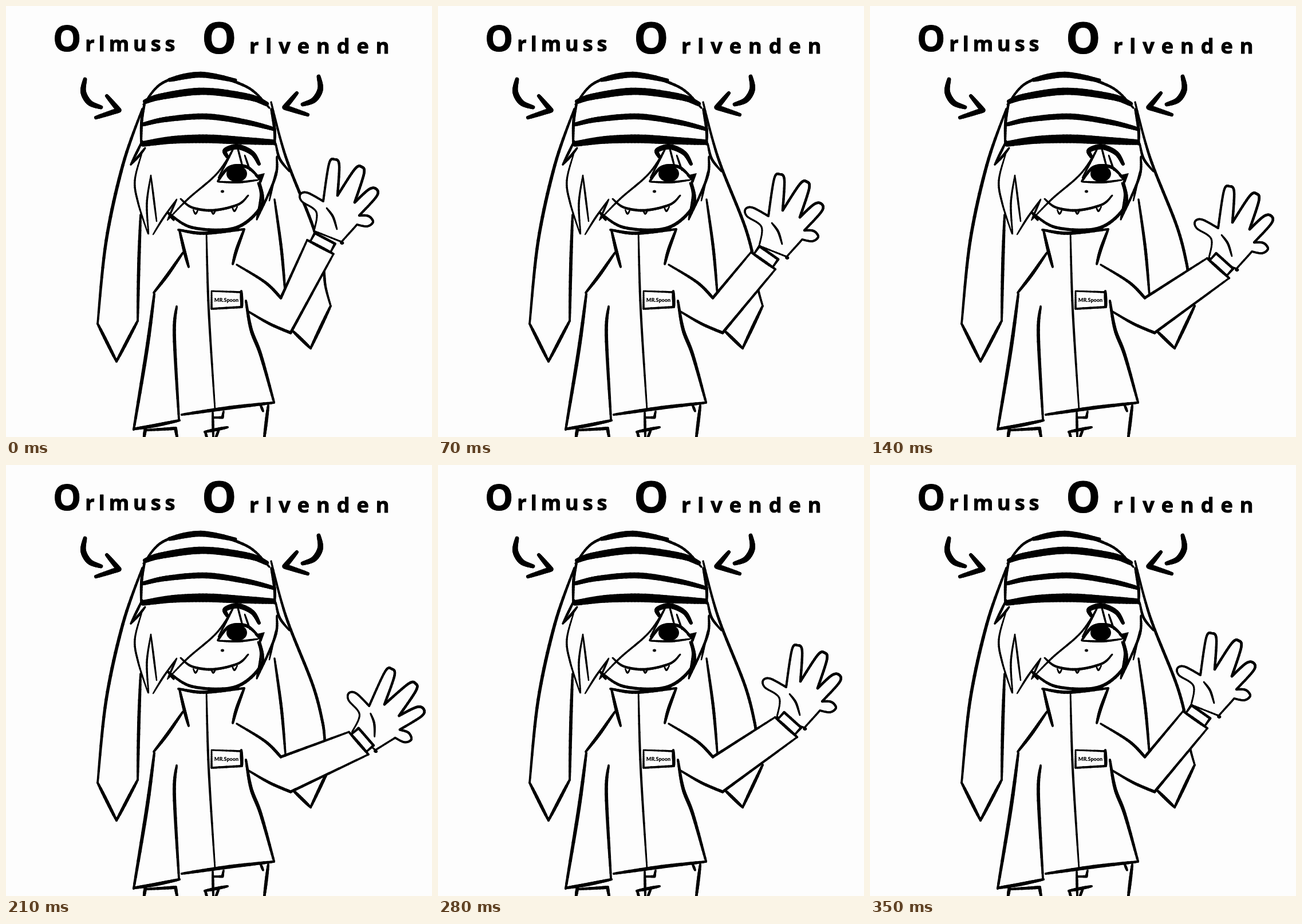
An HTML page with a canvas that plays this animation: 744 by 753 pixels, repeating every 0.42 s.

```html
<!DOCTYPE html>
<html lang="en">
<head>
<meta charset="utf-8">
<title>Waving character</title>
<style>
  html, body { margin: 0; width: 100%; height: 100%; overflow: hidden; background: #fdfdfd; }
  canvas, svg { position: absolute; left: 0; top: 0; }
  .name { font: 700 36px "Open Sans", "Noto Sans", sans-serif; stroke: #000; stroke-linejoin: round; }
  .tag { font: 900 9px Lato, "DejaVu Sans", sans-serif; text-anchor: middle; }
</style>
</head>
<body>
<canvas id="stage" width="744" height="753"></canvas>
<svg width="744" height="753">
  <text class="name" x="82" y="79" letter-spacing="7"><tspan font-size="62">O</tspan>rlmuss</text>
  <text class="name" x="342" y="83" letter-spacing="12"><tspan font-size="76">O</tspan><tspan x="425">rlvenden</tspan></text>
  <text class="tag" x="385" y="517">MR.Spoon</text>
</svg>
<script>
const PAPER = '#fdfdfd', INK = '#000';
const ctx = document.getElementById('stage').getContext('2d');
ctx.lineCap = ctx.lineJoin = 'round';

// "x,y x,y" to points; a trailing "!" doubles a point into a sharp corner.
const parse = text => text.split(' ').flatMap(part => {
  const p = part.replace('!', '').split(',').map(Number);
  return part.endsWith('!') ? [p, p] : [p];
});

// Catmull-Rom samples through the points.
function smooth(pts) {
  const out = [pts[0]], last = pts.length - 1;
  for (let i = 0; i < last; i++) {
    const a = pts[Math.max(i - 1, 0)], b = pts[i], c = pts[i + 1], d = pts[Math.min(i + 2, last)];
    if (b === c) continue;
    for (let t = 0.1; t < 1.01; t += 0.1) {
      out.push([0, 1].map(k => b[k] + t / 2 * (c[k] - a[k] + t * (2 * a[k] - 5 * b[k] + 4 * c[k] - d[k]
        + t * (3 * (b[k] - c[k]) + d[k] - a[k])))));
    }
  }
  return out;
}

// Brush stroke: light at both ends, heavier in the middle.
function stroke(width, pts) {
  const line = smooth(pts);
  ctx.strokeStyle = INK;
  for (let i = 1; i < line.length; i++) {
    ctx.lineWidth = width * (0.7 + 0.45 * Math.sin(Math.PI * i / line.length));
    ctx.beginPath();
    ctx.moveTo(...line[i - 1]);
    ctx.lineTo(...line[i]);
    ctx.stroke();
  }
}

function fill(pts, color = PAPER) {
  ctx.fillStyle = color;
  ctx.beginPath();
  smooth(pts).forEach(p => ctx.lineTo(...p));
  ctx.fill();
}

const pen = (width, ...lines) => lines.forEach(text => stroke(width, parse(text)));

function arrows() {
  for (const side of [-1, 1]) {
    ctx.save();
    ctx.translate(342 + side * 2, side > 0 ? -5 : 0);
    ctx.scale(side, 1);
    pen(9, '202,128 205,150 194,169 174,177');
    pen(8, '164,157 143,182! 183,195');
    ctx.restore();
  }
}

function ears() {
  pen(5, '238,180 204,278 175,410 160,555', '160,555 193,621', '193,621 230,550',
    '235,365 232,450 230,550');
  pen(4.5, '463,168 480,235 497,287 536,385 553,450 558,490 567,524', '469,338 481,425 488,505');
  pen(5, '567,524 532,598', '532,598 501,568');
}

// Outline of five fingers from their tips and the gaps between them.
const tips = parse('-49,-73 11,-134 58,-121 84,-82 78,-25');
const gaps = parse('-21,-42 -9,-61 16,-71 46,-59 54,-36 50,-20');
function handOutline() {
  const pts = [[-25, -9]];
  tips.forEach(([x, y], i) => {
    const [a, b] = [gaps[i], gaps[i + 1]];
    const dx = x - (a[0] + b[0]) / 2, dy = y - (a[1] + b[1]) / 2, size = Math.hypot(dx, dy);
    const u = dx / size * 9, v = dy / size * 9;
    pts.push(a);
    if (i) pts.push(a);
    pts.push([x - u + v, y - v - u], [x, y], [x - u - v, y - v + u]);
  });
  return [...pts, gaps[5], gaps[5], [23, 10], [23, 10], [-25, -9]];
}
const hand = handOutline();

// Per wave position: end of the sleeve, then wrist.
const sleeves = parse('549,421 568,445 608,458 616,486');
const wrists = parse('563,402 586,428 617,449 626,482');

function arm(k) {
  const angle = (28 + 7 * k) * Math.PI / 180, [x, y] = sleeves[k];
  const cuff = (across, along) => [
    x + across * Math.cos(angle) + along * Math.sin(angle),
    y + across * Math.sin(angle) - along * Math.cos(angle)
  ];
  const left = cuff(-26, 0), right = cuff(26, 0);
  const upper = [...parse('403,452 453,483 480,510!'), left];
  const lower = [right, ...parse('497,571! 460,555 422,533')];
  fill([...upper, left, right, ...lower]);

  ctx.save();
  ctx.translate(...wrists[k]);
  ctx.rotate(k === 3 ? 0.28 : 0);
  fill(hand);
  stroke(4, hand);
  pen(3.5, '-3,-49 8,-34 15,-12');
  ctx.restore();

  const band = [cuff(-20, 0), cuff(-20, 17), cuff(20, 17), cuff(20, 0)].flatMap(p => [p, p]);
  fill(band);
  stroke(4, band);
  [upper, [left, right], lower].forEach(line => stroke(4.5, line));
}

function hat() {
  pen(4.5, '240,172 274,134 340,118 420,141 460,178', '463,180 469,215 469,242', '243,166 237,200 236,242');
  pen(9, '286,129 340,120 400,130');
  pen(11, '243,167 272,158 345,149 424,159 455,171');
  pen(9, '239,207 280,198 350,193 420,203 468,215');
  pen(13, '239,241 290,234 350,232 410,235 467,238');
}

function hair() {
  pen(4, '238,236 218,277', '243,248 232,262 218,277', '471,240 478,267 495,289', '473,263 470,300 438,373');
  pen(3, '237,258 225,305 231,345 248,398', '253,296 246,345 249,398', '253,296 263,376',
    '257,399 275,370 298,338', '298,338 283,372', '471,290 460,340',
    '402,240 370,291 318,337 282,374', '397,250 371,300', '403,242 414,284', '417,261 426,287');
}

function face() {
  pen(5, '283,361 325,387 400,388 446,349 443,307', '370,306 390,282 420,281 442,300');
  pen(8, '386,263 383,252 405,246 430,257 442,276');
  pen(3.5, '370,307 405,308 440,304', '440,309 445,331 438,371');
  ctx.fillStyle = INK;
  ctx.beginPath();
  ctx.ellipse(403, 293, 18, 14.5, 0, 0, 7);
  ctx.fill();
  fill(parse('434,296! 452,292! 446,309!'), INK);
  pen(4, '377,324 379,324', '305,337 325,352 362,357 405,347 423,331', '283,361 293,374');
  for (const x of [331, 362, 399]) {
    const y = 356 - Math.max(0, x - 362) / 8;
    pen(2.5, `${x - 4},${y} ${x},${y + 7} ${x + 5},${y - 1}`);
  }
}

function coat() {
  pen(5, '301,391 345,397 416,390', '416,390 403,425 396,451', '303,392 312,430 319,456',
    '309,431 282,470 258,501', '298,525 294,575 302,722');
  pen(5.5, '259,503 246,600 223,740', '419,515 428,565 445,610 468,692',
    '223,739 260,733 303,724', '307,714 390,702 468,693');
  pen(3.5, '350,396 354,530 365,705', '359,498! 411,500! 411,526! 359,529! 359,498');
  pen(5, '411,498 412,526');
}

function legs() {
  pen(5, '244,735 241,754', '246,741 296,738! 299,755', '458,698 451,755', '347,744 387,736');
  pen(4, '361,709 362,755', '362,719 378,719! 380,708', '348,744 351,755', '372,740 366,755', '445,698 449,708');
}

function paint(k) {
  ctx.fillStyle = PAPER;
  ctx.fillRect(0, 0, 744, 753);
  ears();
  arm(k);
  [arrows, hat, hair, face, coat, legs].forEach(part => part());
}

const STEP = 70, STEPS = 6;
const start = performance.now();
let shown = -1;
function tick() {
  const n = Math.floor((performance.now() - start) / STEP) % STEPS;
  const k = 3 - Math.abs(3 - n); // swing out and back
  if (k !== shown) paint(shown = k);
  requestAnimationFrame(tick);
}
tick();
</script>
</body>
</html>
```
